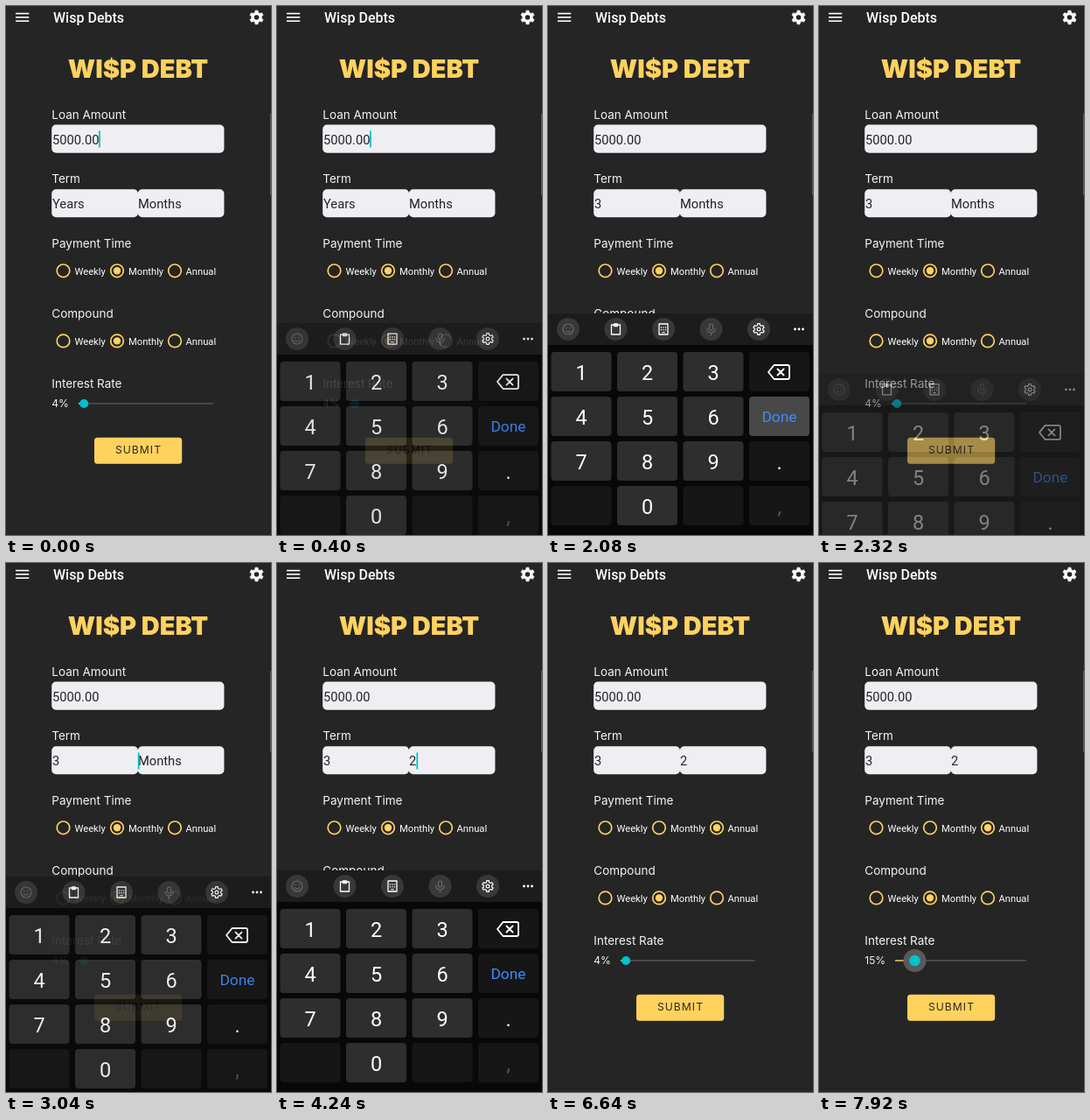
Animation, 303 px wide and 604 px high, one loop 8000 ms. Source, as an HTML page:

```html
<!DOCTYPE html>
<html lang="en">
<head>
<meta charset="utf-8">
<title>Wisp Debts</title>
<style>
  html, body { margin: 0; width: 100%; height: 100%; overflow: hidden; background: #252526; }
  svg { display: block; width: 303px; height: 604px; }
  text { font-family: Roboto, sans-serif; fill: #fff; white-space: pre; }
  .label { font: 400 13.5px Inter, sans-serif; fill: #f4f4f4; }
  .field { font-size: 14.7px; fill: #242426; }
  .option { font-size: 11.2px; }
  .digit { font-size: 23.5px; text-anchor: middle; }
  .mid { text-anchor: middle; }
</style>
</head>
<body>
<svg id="stage" viewBox="0 0 303 604"></svg>
<script>
const LOOP = 8000;
const YELLOW = '#ffd25e', CYAN = '#00c2cb', PAPER = '#efeff3';
const stage = document.getElementById('stage');

function add(parent, tag, attrs, text) {
  const el = document.createElementNS('http://www.w3.org/2000/svg', tag);
  set(el, attrs);
  if (text !== undefined) el.textContent = text;
  parent.appendChild(el);
  return el;
}
function set(el, attrs) {
  for (const k in attrs) el.setAttribute(k, attrs[k]);
}
const group = (parent = stage, attrs = {}) => add(parent, 'g', attrs);
const rect = (p, x, y, width, height, fill, rx = 0) =>
  add(p, 'rect', { x, y, width, height, fill, rx });
const circle = (p, cx, cy, r, attrs) => add(p, 'circle', { cx, cy, r, ...attrs });
const label = (p, x, y, text, cls, attrs = {}) =>
  add(p, 'text', { x, y, class: cls, ...attrs }, text);
const stroke = (p, d, color = '#fff', width = 1.4) =>
  add(p, 'path', { d, fill: 'none', stroke: color, 'stroke-width': width,
    'stroke-linecap': 'round', 'stroke-linejoin': 'round' });

// Outline of a cog with the given number of teeth
function cog(cx, cy, outer, inner, teeth) {
  const pts = [];
  for (let i = 0; i < teeth; i++) {
    [[-0.3, inner], [-0.19, outer], [0.19, outer], [0.3, inner]].forEach(([f, r]) => {
      const a = (i + f) / teeth * Math.PI * 2 - Math.PI / 2;
      pts.push((cx + r * Math.cos(a)).toFixed(2) + ' ' + (cy + r * Math.sin(a)).toFixed(2));
    });
  }
  return 'M' + pts.join('L') + 'Z';
}

// Header
rect(stage, 0, 0, 303, 604, '#252526');
[8.6, 12.9, 17.2].forEach(y => rect(stage, 11, y - 0.8, 15.3, 1.6, '#fff'));
label(stage, 54, 19, 'Wisp Debts', '', { 'font-size': 16, 'font-weight': 500 });
add(stage, 'path', { d: cog(286.5, 13, 8, 5.9, 6), fill: '#fff', stroke: '#fff',
  'stroke-width': 0.6, 'stroke-linejoin': 'round' });
circle(stage, 286.5, 13, 2.8, { fill: '#252526' });
rect(stage, 302, 123, 1, 93, '#5c5c5e');
add(stage, 'text', { x: 151, y: 81.5, class: 'mid',
  style: `font: 900 29px Inter, sans-serif; fill: ${YELLOW}` }, 'WI$P DEBT');

// Form
[['Loan Amount', 128.5], ['Term', 202], ['Payment Time', 275.5],
 ['Compound', 355.5], ['Interest Rate', 436]]
  .forEach(([s, y]) => label(stage, 52.3, y, s, 'label'));
rect(stage, 52.2, 135.6, 197.2, 32.1, PAPER, 5);
rect(stage, 52.2, 209.2, 98.8, 32.1, PAPER, 5);
rect(stage, 150.8, 209.2, 98.6, 32.1, PAPER, 5);
label(stage, 53, 157.5, '5000.00', 'field');
const years = label(stage, 53, 231.3, 'Years', 'field');
const months = label(stage, 151, 231.3, 'Months', 'field');
const caret = rect(stage, 0, 0, 1.8, 19, CYAN);

const RADIO_X = [65.5, 127, 193];
function radioRow(y) {
  return ['Weekly', 'Monthly', 'Annual'].map((s, i) => {
    circle(stage, RADIO_X[i], y, 7.3, { fill: 'none', stroke: YELLOW, 'stroke-width': 1.7 });
    label(stage, [78.5, 140, 205.5][i], y + 4.3, s, 'option');
    return circle(stage, RADIO_X[i], y, i === 1 ? 4.2 : 0, { fill: YELLOW });
  });
}
const ripple = circle(stage, RADIO_X[2], 302.5, 0, { fill: '#fff' });
const payment = radioRow(302.3);
radioRow(382.4);

const rate = label(stage, 52.3, 457.5, '4%', 'label', { style: 'font-size:12px' });
const track = rect(stage, 83, 453.3, 154, 1.3, '#5a585c');
const active = rect(stage, 83, 453.3, 6, 1.3, YELLOW);
const halo = circle(stage, 89, 454, 13, { fill: '#5a5a5a' });
const thumb = circle(stage, 89, 454, 5, { fill: CYAN });

rect(stage, 101, 492.8, 100.2, 30, YELLOW, 3.5);
add(stage, 'text', { x: 151.5, y: 511.3, class: 'mid',
  style: 'font: 400 12.2px Inter, sans-serif; letter-spacing: 1px; fill: #2c2a26' }, 'SUBMIT');

// Keyboard
const board = group();
rect(board, 0, 351, 303, 36, '#1c1c1c');
rect(board, 0, 387, 303, 217, '#080808');
const TOOL_X = [23, 77.5, 132, 186.5, 241];
TOOL_X.forEach(x => circle(board, x, 369, 13, { fill: '#383838' }));
const tool = i => group(board, { transform: `translate(${TOOL_X[i]} 369)` });

const DIM = '#686868';
const smile = tool(0);
circle(smile, 0, 0, 6, { fill: 'none', stroke: DIM, 'stroke-width': 1.2 });
stroke(smile, 'M-2.8 1.6Q0 4.8 2.8 1.6M-2 -1.8v.4M2 -1.8v.4', DIM, 1.2);
stroke(tool(1), 'M-5 -5h10v11h-10ZM-2 -6h4v2.5h-4Z', '#fff', 1.3);
const pad = tool(2);
stroke(pad, 'M-5 -6h10v12h-10Z', '#fff', 1.3);
for (let i = 0; i < 6; i++)
  circle(pad, (i % 3 - 1) * 2.5, (i < 3 ? -2 : 0.8), 0.75, { fill: '#fff' });
stroke(pad, 'M-1.4 3.7h2.8', '#fff', 1.1);
stroke(tool(3), 'M-2 -5q2 -2 4 0v5q-2 2.4 -4 0ZM-4.7 -1q0 5 4.7 5t4.7 -5M0 4v3', DIM, 1.2);
const gear = tool(4);
stroke(gear, cog(0, 0, 6.5, 4.8, 6), '#fff', 1.2);
circle(gear, 0, 0, 1.9, { fill: 'none', stroke: '#fff', 'stroke-width': 1.2 });
[282.5, 287, 291.5].forEach(x => circle(board, x, 369, 1.4, { fill: '#fff' }));

const KEYS = ['1', '2', '3', 'back', '4', '5', '6', 'Done', '7', '8', '9', '.', '', '0', ' ', ','];
const keys = {};
KEYS.forEach((k, i) => {
  const x = 3.5 + (i % 4) * 75.5, y = 395 + (i >> 2) * 51;
  const fill = /\d/.test(k) ? '#2e2e2e' : '#161616';
  keys[k] = { fill, el: rect(board, x, y, 69, 45, fill, 4) };
  const cx = x + 34.5;
  if (k === 'back') {
    const g = group(board, { transform: `translate(${cx - 0.5} 418)` });
    stroke(g, 'M-12 0L-5.5 -8H10Q12 -8 12 -6V6Q12 8 10 8H-5.5ZM-1.5 -3.5l7 7M5.5 -3.5l-7 7', '#fff', 1.8);
  } else if (k === 'Done') {
    label(board, cx, 475.3, k, 'mid', { style: 'font-size:17.4px;fill:#3d8bff' });
  } else if (k.trim()) {
    label(board, cx, y + 32, k, 'digit', k === ',' ? { style: 'fill:#555' } : {});
  }
});

// Timeline
const SHOW = [100, 2720], HIDE = [2240, 4880], GONE = 253;
const PRESS = [['3', 1280, 1500], ['Done', 2080, 2220], ['2', 4000, 4220], ['Done', 4800, 4940]];
// start, end, caret x, caret y
const FOCUS = [
  [0, 560, 106, 142.5], [560, 1340, 52.6, 216.5], [1340, 2080, 61.8, 216.5],
  [2720, 4060, 150.8, 216.5], [4060, 4800, 159.4, 216.5]
];
const TAP = 5660, PICK = 5820, GRAB = 7500;
const clamp = v => Math.max(0, Math.min(1, v));

function boardOffset(t) {
  for (let i = 0; i < 2; i++) {
    if (t >= SHOW[i] && t < HIDE[i]) return 180 * (1 - clamp((t - SHOW[i]) / 400)) ** 2;
    if (t >= HIDE[i] && t < HIDE[i] + 320) {
      const p = (t - HIDE[i]) / 320;
      return 244 * p + 112 * p * p;
    }
  }
  return GONE;
}

function render(t) {
  const off = boardOffset(t);
  set(board, { transform: `translate(0 ${off.toFixed(2)})`, opacity: Math.exp(-off / 80) });
  for (const k in keys) {
    const down = PRESS.some(([key, a, b]) => key === k && t >= a && t < b);
    keys[k].el.setAttribute('fill', down ? '#484848' : keys[k].fill);
  }

  years.textContent = t < 1340 ? 'Years' : '3';
  months.textContent = t < 4060 ? 'Months' : '2';
  const f = FOCUS.find(([a, b]) => t >= a && t < b);
  const lit = f && (t - f[0]) % 1040 < 520;
  set(caret, { opacity: lit ? 1 : 0, x: f ? f[2] : 0, y: f ? f[3] : 0 });

  const grow = clamp((t - TAP) / 260), fade = clamp((t - TAP - 300) / 480);
  set(ripple, { r: t < TAP ? 0 : 6 + 12 * grow, opacity: 0.18 * (1 - fade) });
  const picked = t >= PICK;
  const pop = 1.3 - 0.3 * clamp((t - PICK) / 160);
  set(payment[1], { r: picked ? 0 : 4.2 });
  set(payment[2], { r: picked ? 4.2 * pop : 0 });

  const held = t >= GRAB;
  const value = Math.round(4 + 11 * clamp((t - 7560) / 350));
  const left = value < 10 ? 83 : 87;
  const x = left + (237 - left) * value / 100;
  rate.textContent = value + '%';
  set(track, { x: left, width: 237 - left });
  set(active, { x: left, width: x - left });
  set(halo, { cx: x, r: 13 * clamp((t - GRAB + 60) / 140), opacity: held ? 1 : 0 });
  set(thumb, { cx: x, r: held ? 6.3 : 5 });
}

const start = performance.now();
function tick() {
  render((performance.now() - start) % LOOP);
  requestAnimationFrame(tick);
}
render(0);
requestAnimationFrame(tick);
</script>
</body>
</html>
```
